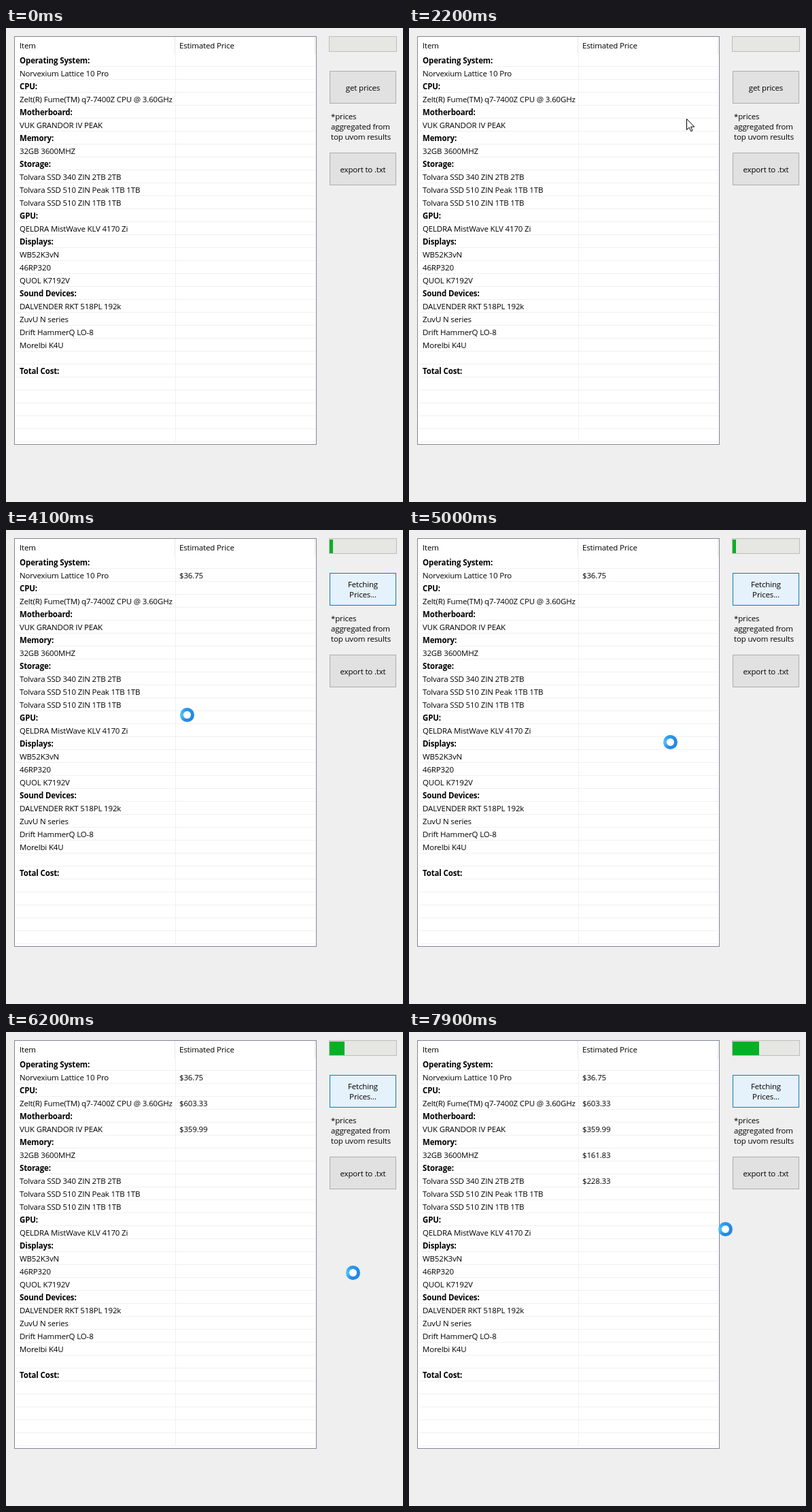
Animation of 584x696 px, one loop 8 s. Source, as an HTML page:

```html
<!DOCTYPE html>
<html lang="en">
<head>
<meta charset="utf-8">
<title>Parts price list</title>
<style>
html, body { margin: 0; width: 100%; height: 100%; overflow: hidden; }
body {
  position: relative; background: #efefef; color: #000;
  font: 11.5px/19px "Open Sans", "Noto Sans", sans-serif; letter-spacing: -.15px;
}
body *, .list::before, .list::after { position: absolute; box-sizing: border-box; white-space: pre; }
.list { left: 12px; top: 12px; width: 445px; height: 600px; background: #fff; border: 1px solid #828790; }
.lines {
  left: 2px; top: 25px; width: 440px; height: 570px;
  background: repeating-linear-gradient(transparent 0 18px, #f0f0f0 18px 19px);
}
.list::before, .list::after { content: ""; top: 0; width: 1px; height: 26px; background: #e5e5e5; }
.list::before { left: 235px; }
.list::after { left: 441px; }
.column { left: 236px; top: 26px; width: 1px; height: 569px; background: #f0f0f0; }
#rows { left: 0; top: 0; }
.item { left: 7px; }
.price { left: 242px; }
.bar { left: 475px; top: 12px; width: 100px; height: 23px; background: #e6e6e3; border: 1px solid #bcbcbc; }
#fill { left: 476px; top: 14px; height: 20px; background: #06b025; }
.button {
  left: 476px; width: 98px; height: 48px; background: #e1e1e1; border: 1px solid #adadad;
  display: flex; align-items: center; justify-content: center; text-align: center; line-height: 15px;
}
.button span { position: static; }
.button.hover { background: #e5f1fb; border-color: #0f7cb8; }
.button.pressed { background: #c8e1f5; border-color: #05609c; }
.note { left: 478px; top: 122px; line-height: 15px; }
#arrow, #wait { left: 0; top: 0; }
#wait {
  width: 21px; height: 21px; margin: -10px 0 0 -10px; border-radius: 50%;
  background: conic-gradient(from 270deg, #4fc3f8, #2b9af0 20%, #2389e6 45%, #2389e6 80%, #4fc3f8);
}
#wait::after {
  content: ""; position: absolute; inset: 5px; border-radius: 50%; background: #fff;
}
</style>
</head>
<body>
<div class="list">
  <div class="lines"></div>
  <div class="column"></div>
  <div class="item" style="top:3px">Item</div>
  <div class="price" style="top:3px">Estimated Price</div>
  <div id="rows"></div>
</div>
<div class="bar"></div>
<div id="fill"></div>
<div class="button" id="get" style="top:63px"><span>get prices</span></div>
<div class="note">*prices
aggregated from
top uvom results</div>
<div class="button" style="top:183px"><span>export to .txt</span></div>
<svg id="arrow" width="13" height="20" viewBox="0 0 13 20">
  <path d="M.5 .5V16.5L4.2 13L6.7 18.6L9 17.6L6.6 12.1H11.7Z" fill="#fff" stroke="#000"/>
</svg>
<div id="wait"></div>

<script>
const LOOP = 8000, ENTER = 1200, PRESS = 2900, FETCH = 3100;

// Headings end with a colon; the index is also the row number.
const items = [
  'Operating System:', 'Norvexium Lattice 10 Pro',
  'CPU:', 'Zelt(R) Fume(TM) q7-7400Z CPU @ 3.60GHz',
  'Motherboard:', 'VUK GRANDOR IV PEAK',
  'Memory:', '32GB 3600MHZ',
  'Storage:', 'Tolvara SSD 340 ZIN 2TB 2TB',
  'Tolvara SSD 510 ZIN Peak 1TB 1TB', 'Tolvara SSD 510 ZIN 1TB 1TB',
  'GPU:', 'QELDRA MistWave KLV 4170 Zi',
  'Displays:', 'WB52K3vN', '46RP320', 'QUOL K7192V',
  'Sound Devices:', 'DALVENDER RKT 518PL 192k', 'ZuvU N series',
  'Drift HammerQ LO-8', 'Morelbi K4U',
  '', 'Total Cost:'
];

// Row, text, time of arrival, progress width
const prices = [
  [1, '$36.75', 4000, 5],
  [3, '$603.33', 5200, 14],
  [5, '$359.99', 6000, 22],
  [7, '$161.83', 6900, 31],
  [9, '$228.33', 7600, 39]
];

// Pointer path: time, x, y
const path = [
  [1200, 516, 0], [1500, 432, 68], [1800, 352, 136], [2000, 362, 146],
  [2200, 408, 133], [2500, 498, 108], [2800, 529, 95], [3000, 530, 94],
  [3200, 515, 110], [3500, 315, 230], [3700, 175, 294], [3850, 162, 288],
  [4100, 266, 271], [4400, 372, 286], [4700, 402, 300], [5000, 384, 311],
  [5300, 460, 376], [5600, 540, 360], [5900, 486, 312], [6200, 510, 353],
  [6450, 535, 428], [6700, 470, 510], [7000, 440, 582], [7300, 530, 500],
  [7500, 520, 422], [7900, 465, 289]
];

const $ = id => document.getElementById(id);
const get = $('get'), label = get.firstChild, arrow = $('arrow'), wait = $('wait'), fill = $('fill');

function addCell(cls, row, text) {
  const cell = document.createElement('div');
  cell.className = cls;
  cell.style.top = 25 + row * 19 + 'px';
  cell.textContent = text;
  if (text.endsWith(':')) cell.style.fontWeight = 700;
  $('rows').append(cell);
  return cell;
}

items.forEach((text, row) => addCell('item', row, text));
const cells = prices.map(([row, text]) => addCell('price', row, text));

// Cubic Hermite curve through the path points
function pointer(t) {
  const last = path.length - 1;
  let i = 0;
  while (i < last - 1 && path[i + 1][0] <= t) i++;
  const a = path[i], b = path[i + 1];
  const p = path[Math.max(i - 1, 0)], n = path[Math.min(i + 2, last)];
  const span = b[0] - a[0], u = Math.min(1, Math.max(0, (t - a[0]) / span));
  return [1, 2].map(k => {
    const m0 = (b[k] - p[k]) / (b[0] - p[0]) * span;
    const m1 = (n[k] - a[k]) / (n[0] - a[0]) * span;
    const d = b[k] - a[k];
    return a[k] + u * (m0 + u * (3 * d - 2 * m0 - m1 + u * (m0 + m1 - 2 * d)));
  });
}

const show = (el, on) => { el.style.visibility = on ? 'visible' : 'hidden'; };

function draw(now) {
  const t = Math.floor(now % LOOP / 100) * 100;
  const [x, y] = pointer(t).map(Math.round);
  const fetching = t >= FETCH;
  const over = t >= ENTER && x >= 476 && x < 574 && y >= 63 && y < 111;

  arrow.style.transform = wait.style.transform = `translate(${x}px, ${y}px)`;
  show(arrow, t >= ENTER && !fetching);
  show(wait, fetching);

  get.classList.toggle('pressed', t >= PRESS && !fetching);
  get.classList.toggle('hover', over || fetching);
  label.textContent = fetching ? 'Fetching\nPrices...' : 'get prices';

  let width = 0;
  prices.forEach(([, , time, goal], i) => {
    show(cells[i], t >= time);
    if (t >= time) width += (goal - width) * Math.min(1, (t - time + 100) / 200);
  });
  fill.style.width = width + 'px';
  requestAnimationFrame(draw);
}
requestAnimationFrame(draw);
</script>
</body>
</html>
```
